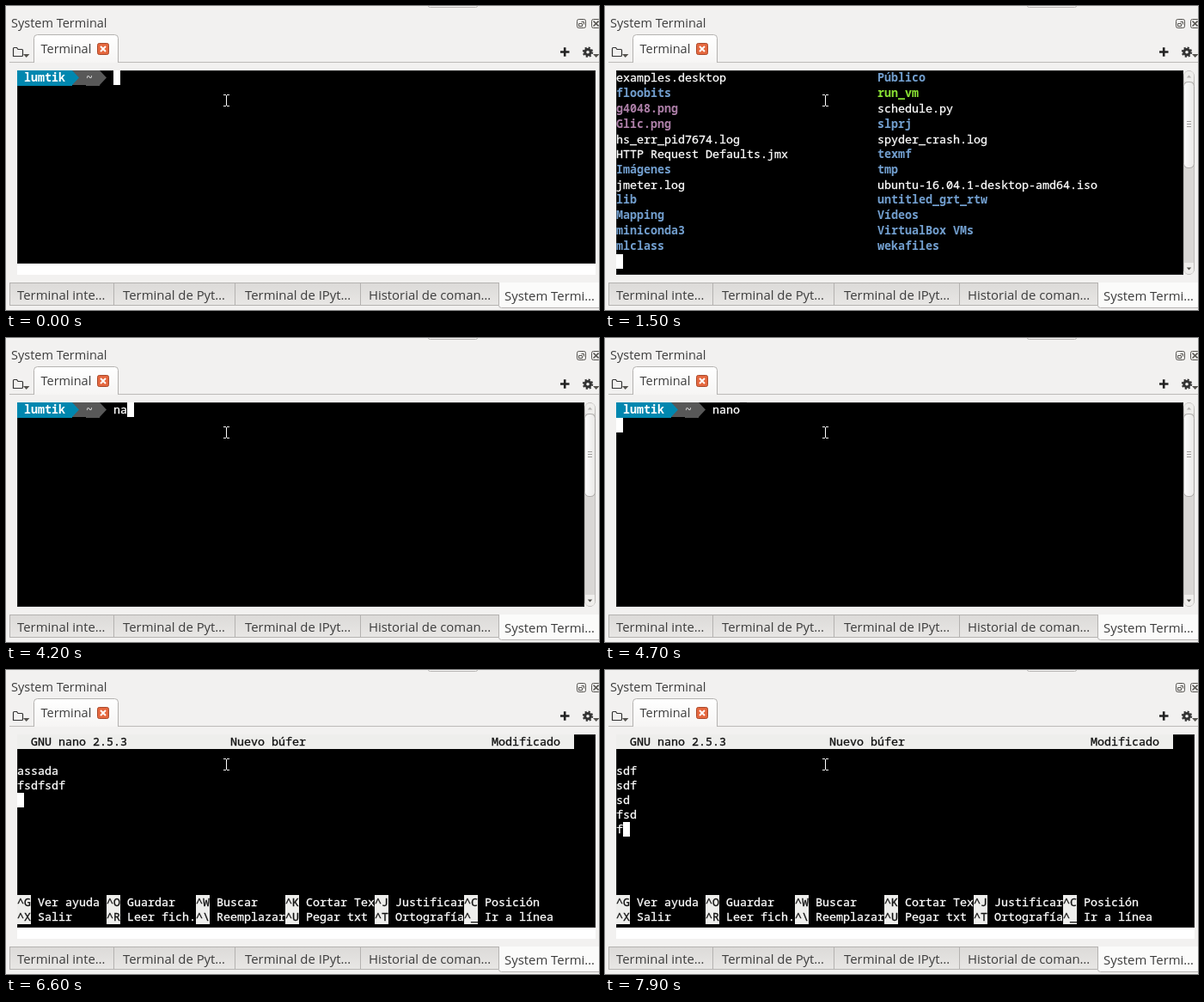
An HTML page for the animation above (8 s loop, 690 px wide and 354 px high).

```html
<!DOCTYPE html>
<html lang="es">
<head>
<meta charset="utf-8">
<title>System Terminal</title>
<style>
html, body { margin: 0; width: 100%; height: 100%; overflow: hidden; background: #f2f1f0; }
svg { display: block; }
text { white-space: pre; }
.ui { font: 14.5px "Open Sans", "Noto Sans", sans-serif; fill: #3c3c3c; }
.tabs { font-size: 14.9px; }
#screen text { font: 13.3333px "Noto Sans Mono", "DejaVu Sans Mono", monospace; stroke-width: .3px; }
#screen text.b { font-weight: 700; stroke: none; }
rect, .crisp { shape-rendering: crispEdges; }
.soft { shape-rendering: auto; }
</style>
</head>
<body>
<svg width="690" height="354" viewBox="0 0 690 354">
  <defs>
    <linearGradient id="tab" x2="0" y2="1">
      <stop offset="0" stop-color="#dcdad8"/><stop offset="1" stop-color="#e8e7e5"/>
    </linearGradient>
    <linearGradient id="front" x2="0" y2="1">
      <stop offset="0" stop-color="#fff"/><stop offset="1" stop-color="#f6f5f4"/>
    </linearGradient>
    <linearGradient id="thumb">
      <stop offset="0" stop-color="#fdfdfd"/><stop offset="1" stop-color="#e9e8e6"/>
    </linearGradient>
  </defs>
  <rect width="690" height="354" fill="#f2f1f0"/>

  <!-- dock title -->
  <path d="M491.5 -1V0Q491.5 1.5 493.5 1.5H546.5Q548.5 1.5 548.5 0V-1" fill="#f8f7f6" stroke="#b8b6b4"/>
  <text class="ui" x="6" y="25">System Terminal</text>
  <g fill="none" stroke="#55534f">
    <rect class="soft" x="664.5" y="15.5" width="10" height="10" rx="2"/>
    <path d="M669.5 18.5H672.5V21.5M666.5 20.5H670.5V23.5H666.5Z"/>
    <rect class="soft" x="681.5" y="15.5" width="10" height="10" rx="2"/>
    <path d="M683.5 17.5L689.5 23.5M689.5 17.5L683.5 23.5" stroke-width="1.6"/>
  </g>

  <!-- terminal tab and tool buttons -->
  <path class="crisp" d="M4 65.5H690" stroke="#bcbab8"/>
  <path d="M32.5 66V37.5Q32.5 33.5 36.5 33.5H126.5Q130.5 33.5 130.5 37.5V66" fill="url(#front)" stroke="#b4b2b0"/>
  <text class="ui" x="40.5" y="55">Terminal</text>
  <rect class="soft" x="106.5" y="43.5" width="13" height="13" rx="2" fill="#e5683f" stroke="#a9492b"/>
  <path d="M110 47L116 53M116 47L110 53" stroke="#fff" stroke-width="2"/>
  <path d="M8.5 58.5V49.5Q8.5 48.5 9.5 48.5H12.5L14 50.5H18.5Q19.5 50.5 19.5 51.5V57.5Q19.5 58.5 18.5 58.5Z" fill="none" stroke="#333" stroke-width="1.2"/>
  <path d="M20 56H27.4L23.7 60ZM683 56H690.4L686.7 60Z" fill="#55534f"/>
  <path d="M645 53.5H655.5M650.2 48.3V58.7" stroke="#222" stroke-width="2.6"/>
  <circle cx="677" cy="53.7" r="3.3" fill="none" stroke="#333" stroke-width="3"/>
  <circle cx="677" cy="53.7" r="5.2" fill="none" stroke="#333" stroke-width="2" stroke-dasharray="2.1 1.984"/>

  <rect x="13" y="75" width="673" height="238" fill="#fff"/>
  <g id="screen"></g>

  <!-- mouse pointer -->
  <path class="crisp" d="M253 103.5H256M257 103.5H260M256.5 104V116M253 116.5H256M257 116.5H260" fill="none" stroke="#fff"/>

  <!-- dock tabs -->
  <rect x="4" y="322" width="570" height="27" fill="url(#tab)"/>
  <path class="crisp" d="M4 322.5H574M4 348.5H574M4.5 322V349M125.5 322V349M266.5 322V349M412.5 322V349" fill="none" stroke="#b4b2b0"/>
  <path d="M573.5 322V348.5Q573.5 351.5 576.5 351.5H690V322Z" fill="#fbfbfa"/>
  <path d="M573.5 322V348.5Q573.5 351.5 576.5 351.5H690" fill="none" stroke="#b4b2b0"/>
  <g class="ui tabs">
    <text x="13" y="342">Terminal inte…</text>
    <text x="136" y="342">Terminal de Pyt…</text>
    <text x="278" y="342">Terminal de IPyt…</text>
    <text x="422" y="342">Historial de coman…</text>
    <text x="580" y="343">System Termi…</text>
  </g>
</svg>
<script>
const LEFT = 13, TOP = 75, CELL = 8, ROW = 17, BOLD_ROW = 18;
const DIR = '#729fcf', EXE = '#8ae234', IMG = '#ad7fa8', WHITE = '#fff', PALE = '#eeeeec';
const BLUE = '#0087af', GREY = '#585858', INK = '#111';
const LOOP = 8000;
const screenEl = document.getElementById('screen');

const colX = col => LEFT + col * CELL;
const box = (x, y, w, h, fill) => `<rect x="${x}" y="${y}" width="${w}" height="${h}" fill="${fill}"/>`;
const put = (col, y, s, fill = WHITE, bold = false) =>
  s ? `<text class="${bold ? 'b' : ''}" x="${colX(col)}" y="${y + 13}" fill="${fill}" stroke="${fill}">${s}</text>` : '';
const cursor = (col, y) => box(colX(col), y, CELL, ROW, WHITE);

// Directory listing: left name, left colour, right name, right colour
const files = [
  ['examples.desktop', WHITE, 'Público', DIR],
  ['floobits', DIR, 'run_vm', EXE],
  ['g4048.png', IMG, 'schedule.py', WHITE],
  ['Glic.png', IMG, 'slprj', DIR],
  ['hs_err_pid7674.log', WHITE, 'spyder_crash.log', WHITE],
  ['HTTP Request Defaults.jmx', WHITE, 'texmf', DIR],
  ['Imágenes', DIR, 'tmp', DIR],
  ['jmeter.log', WHITE, 'ubuntu-16.04.1-desktop-amd64.iso', WHITE],
  ['lib', DIR, 'untitled_grt_rtw', DIR],
  ['Mapping', DIR, 'Vídeos', DIR],
  ['miniconda3', DIR, 'VirtualBox VMs', DIR],
  ['mlclass', DIR, 'wekafiles', DIR]
];

const keys = [
  ['^G', 'Ver ayuda', '^O', 'Guardar', '^W', 'Buscar', '^K', 'Cortar Tex', '^J', 'Justificar', '^C', 'Posición'],
  ['^X', 'Salir', '^R', 'Leer fich.', '^\\', 'Reemplazar', '^U', 'Pegar txt', '^T', 'Ortografía', '^_', 'Ir a línea']
];

// Black console area with its faint rim
const panel = (w, h) => box(LEFT, TOP, w, h, '#1c1c1c') + box(LEFT + 1, TOP + 1, w - 2, h - 2, '#000');
const wide = () => panel(673, 225);

function scrolled(end) {
  const grip = (88 + end) / 2 - 4;
  return panel(660, 238) + box(673, TOP, 13, 238, '#f2f1f0') +
    `<rect class="soft" x="673.5" y="75.5" width="12" height="237" rx="6" fill="#d9d7d5" stroke="#bebcba"/>
     <path d="M674 88V81Q674 76 679.5 76T685 81V88ZM674 299V307Q674 312 679.5 312T685 307V299Z" fill="#efeeec"/>
     <path d="M676.8 83.5H682.2L679.5 80.5Z" fill="#b5b3b1"/>
     <path d="M676.8 304.5H682.2L679.5 307.5Z" fill="#55534f"/>
     <rect class="soft" x="673.5" y="88.5" width="12" height="${end - 89}" rx="5" fill="url(#thumb)" stroke="#aaa8a6"/>
     <path d="M677 ${grip}h5m-5 3h5m-5 3h5" stroke="#a09e9c"/>`;
}

// Only the bold segments fill the taller row
function prompt(y, cmd) {
  const arrow = (col, fill) =>
    `<path d="M${colX(col)} ${y}l${CELL} ${ROW / 2}l${-CELL} ${ROW / 2}z" fill="${fill}"/>`;
  return box(colX(0), y, 64, BOLD_ROW, BLUE) +
    box(colX(8), y, 16, ROW, GREY) + box(colX(10), y, 16, BOLD_ROW, GREY) +
    arrow(8, BLUE) + arrow(12, GREY) +
    put(1, y, 'lumtik', WHITE, true) + put(10, y, '~', '#d0d0d0', true) +
    put(14, y, cmd) + cursor(14 + cmd.length, y);
}

const entered = cmd => prompt(TOP, cmd) + box(colX(14 + cmd.length), TOP, CELL, ROW, '#000') + cursor(0, TOP + BOLD_ROW);

// Rows holding bold text are one pixel taller
function listing(cmd) {
  let y = TOP, out = scrolled(189);
  for (const [a, ca, b, cb] of files) {
    const boldA = ca !== WHITE, boldB = cb !== WHITE;
    out += put(0, y, a, ca, boldA) + put(38, y, b, cb, boldB);
    y += boldA || boldB ? BOLD_ROW : ROW;
  }
  return out + (cmd === undefined ? cursor(0, y) : prompt(y, cmd));
}

function nano(text) {
  const rowY = r => TOP + r * ROW;
  let out = wide() + box(LEFT, TOP, 648, ROW, PALE) +
    put(2, TOP, 'GNU nano 2.5.3', INK) + put(31, TOP, 'Nuevo búfer', INK) +
    (text ? put(69, TOP, 'Modificado', INK) : '');
  keys.forEach((line, r) => {
    for (let i = 0; i < 6; i++) {
      const y = rowY(11 + r), col = i * 13;
      out += box(colX(col), y, 16, ROW, PALE) + put(col, y, line[2 * i], INK) + put(col + 3, y, line[2 * i + 1]);
    }
  });
  // The view jumps half a page once eight lines are full
  let lines = text.split('\n');
  if (lines.length > 8) lines = lines.slice(4);
  lines.forEach((s, i) => { out += put(0, rowY(2 + i), s); });
  return out + cursor(lines[lines.length - 1].length, rowY(1 + lines.length));
}

const steps = [
  [0, () => wide() + prompt(TOP, '')],
  [1200, () => wide() + prompt(TOP, 'l')],
  [1300, () => wide() + prompt(TOP, 'ls')],
  [1400, () => wide() + entered('ls')],
  [1500, () => listing()]
];
const add = (make, list) => list.forEach(([t, s]) => steps.push([t, () => make(s)]));

add(listing, [[1600, ''], [2200, 'c'], [2300, 'cl'], [2500, 'clea'], [2700, 'clear']]);
steps.push([2800, () => scrolled(185) + cursor(0, TOP)]);
add(s => scrolled(185) + prompt(TOP, s), [[2900, ''], [4200, 'na'], [4300, 'nan'], [4500, 'nano']]);
steps.push([4700, () => scrolled(185) + entered('nano')]);

// Keystrokes added to the buffer at each moment
let buffer = '';
add(nano, [
  [4800, ''], [5200, 'as'], [5400, 'sa'], [5500, 'd'], [5600, 'a'], [5800, '\n'],
  [6100, 'f'], [6200, 'sd'], [6300, 'f'], [6400, 'sd'], [6500, 'f'], [6600, '\n'],
  [6800, 'sd'], [6900, 'f\n'], [7000, 'sdf'], [7100, '\ns'], [7200, 'df\n'], [7300, 'sdf'],
  [7400, '\nsd'], [7500, '\nf'], [7600, 's'], [7700, 'd'], [7800, '\n'], [7900, 'f']
].map(([t, s]) => [t, buffer += s]));

let shown = -1;
function draw() {
  const t = performance.now() % LOOP;
  let i = steps.length - 1;
  while (steps[i][0] > t) i--;
  if (i !== shown) screenEl.innerHTML = steps[shown = i][1]();
  requestAnimationFrame(draw);
}
draw();
</script>
</body>
</html>
```
